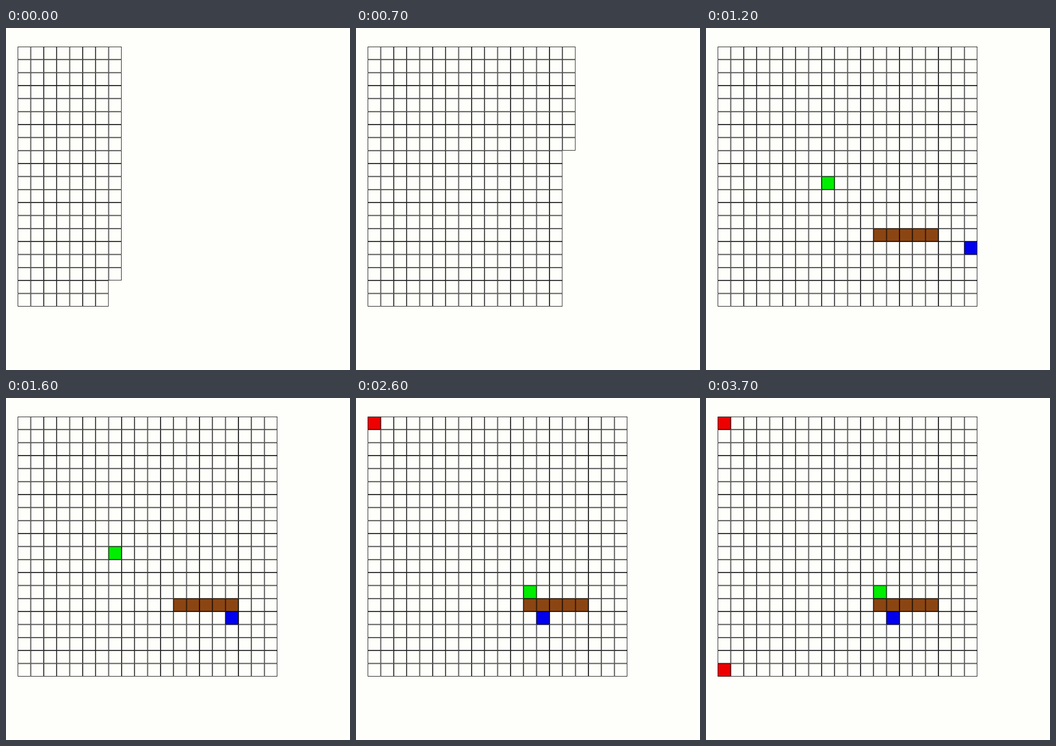
Recreate the animation shown at these times as an HTML page with a canvas. Size 592 px wide and 588 px high, loop 4.1 s.

```html
<!DOCTYPE html>
<html lang="en">
<head>
<meta charset="utf-8">
<title>Grid chase</title>
<style>
  html, body { margin: 0; width: 100%; height: 100%; overflow: hidden; background: #fefffb; }
  canvas { display: block; }
</style>
</head>
<body>
<canvas id="stage" width="592" height="588"></canvas>
<script>
const ctx = document.getElementById('stage').getContext('2d');
const LOOP = 4100, TICK = 100;
const SIZE = 20, CELL = 22.34, LEFT = 20.2, TOP = 32, LINE = 0.8;
const PAPER = '#fefffb', GREEN = '#00ee00', BLUE = '#0000ee', RED = '#ee0000', BROWN = '#8b4513';

const clamp = (v, lo, hi) => Math.min(hi, Math.max(lo, v));

// Each cell carries its own inner border, so shared edges look twice as thick.
function cell(col, row, fill) {
  const x = LEFT + col * CELL, y = TOP + row * CELL;
  ctx.fillStyle = fill;
  ctx.fillRect(x, y, CELL, CELL);
  ctx.strokeRect(x + LINE / 2, y + LINE / 2, CELL - LINE, CELL - LINE);
}

// The grid fills column by column, top to bottom.
function grid(tick) {
  const count = tick >= 12 ? SIZE * SIZE : Math.round(158 + tick * 150 / 7);
  for (let i = 0; i < count; i++) cell(Math.floor(i / SIZE), i % SIZE, PAPER);
}

function runner(tick) {
  const col = tick < 16 ? 8 : 7 + clamp(tick - 16, 0, 5);
  const row = 10 + clamp(tick - 23, 0, 3);
  cell(col, row, GREEN);
}

function chaser(tick) {
  const steps = clamp(tick - 12, 0, 3) + clamp(tick - 16, 0, 3);
  cell(19 - steps, 15, BLUE);
}

function draw(time) {
  const tick = Math.floor((time % LOOP) / TICK);
  ctx.fillStyle = PAPER;
  ctx.fillRect(0, 0, 592, 588);
  ctx.strokeStyle = '#000';
  ctx.lineWidth = LINE;

  grid(tick);
  if (tick >= 12) {
    for (let col = 12; col < 17; col++) cell(col, 14, BROWN);
    runner(tick);
    chaser(tick);
  }
  if (tick >= 23) cell(0, 0, RED);
  if (tick >= 35) cell(0, 19, RED);
}

function loop() {
  draw(performance.now());
  requestAnimationFrame(loop);
}
loop();
</script>
</body>
</html>
```
